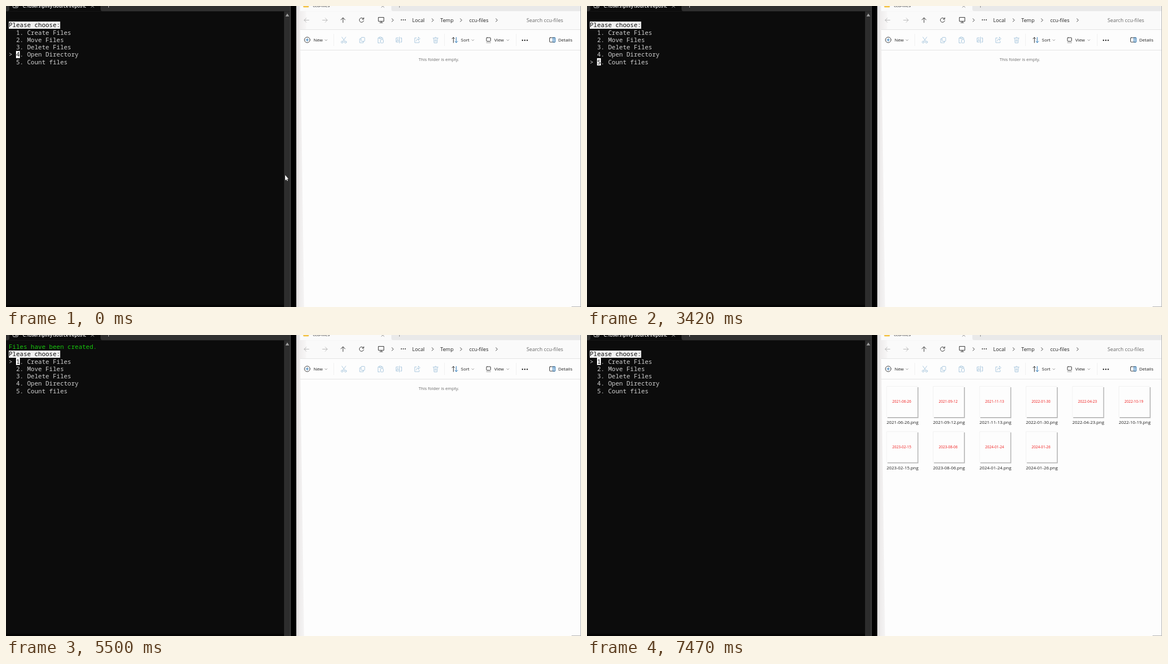
These frames come from a looping animation (1034 by 542 pixels, 8 s). An HTML page:

```html
<!DOCTYPE html>
<html lang="en">
<head>
<meta charset="utf-8">
<title>Terminal and folder</title>
<style>
html, body { margin: 0; width: 100%; height: 100%; overflow: hidden; background: #000; }
svg { display: block; }
text { font: 8px "Open Sans", "Noto Sans", sans-serif; fill: #1f1f1f; white-space: pre; }
.term text { font: 11px "Noto Sans Mono", "DejaVu Sans Mono", monospace; fill: #d2d2d2; }
.term .green { fill: #16c60c; }
.term .inv { fill: #0c0c0c; }
.tab { font-weight: 600; fill: #fff; }
.path text { font-size: 9.2px; }
.path .hint { fill: #666; }
.empty { font-size: 7.76px; fill: #6a6a6a; }
.file text { font-size: 7.9px; text-anchor: middle; }
.file .date { font-size: 6.5px; fill: #f01818; }
.line { fill: none; stroke: #3a3a3a; stroke-width: 1; stroke-linecap: round; stroke-linejoin: round; }
.soft { stroke: #b9b9b9; }
.off { stroke: #abc8de; }
.thin { stroke: #777; stroke-width: .8; }
.blue { stroke: #2a78b8; }

/* --row is the selected menu line */
.term { --row: 3; animation: row 8s step-end infinite; }
.cursor { transform: translateY(calc(var(--row) * 13.25px)); }
.digits { transform: translateY(calc(var(--row) * -13.25px)); }
.pointer, .count, .made, .empty, .files, .pages, .thumbs { animation: 8s step-end infinite; }
.pointer { animation-name: pointer; }
.count { animation-name: count; }
.made { animation-name: made; }
.empty { animation-name: empty; }
.files { animation-name: files; }
.pages { animation-name: pages; }
.thumbs { animation-name: thumbs; }
@keyframes row {
  0% { --row: 3; } 1.625% { --row: 4; } 47.625% { --row: 3; }
  53.125% { --row: 2; } 56.625% { --row: 1; } 61.625%, 100% { --row: 0; }
}
@keyframes pointer { 0% { opacity: 1; } 17.125%, 100% { opacity: 0; } }
@keyframes count { 0% { opacity: 0; } 17.125% { opacity: 1; } 42.75%, 100% { opacity: 0; } }
@keyframes made { 0% { opacity: 0; } 68.75% { opacity: 1; } 93.375%, 100% { opacity: 0; } }
@keyframes empty { 0% { opacity: 1; } 88.125%, 100% { opacity: 0; } }
@keyframes files { 0% { opacity: 0; } 88.125%, 100% { opacity: 1; } }
@keyframes pages { 0% { opacity: 1; } 89.75%, 100% { opacity: 0; } }
@keyframes thumbs { 0% { opacity: 0; } 89.75%, 100% { opacity: 1; } }
</style>
</head>
<body>
<svg width="1034" height="542" viewBox="0 0 1034 542">
  <defs>
    <linearGradient id="edge">
      <stop offset="0" stop-color="#dedcdc"/>
      <stop offset=".35" stop-color="#efeded"/>
      <stop offset="1" stop-color="#f8f7f7"/>
    </linearGradient>
    <path id="chev" class="line" d="M-1.5-2.7 1.2 0-1.5 2.7"/>
    <path id="drop" class="line thin" d="M-1.8-.8 0 1 1.8-.8"/>
    <path id="arrow" d="M4.3 0H-4.3M-.6-3.8-4.3 0-.6 3.8"/>
    <g id="dots"><circle cx="-3.5" r="1"/><circle r="1"/><circle cx="3.5" r="1"/></g>
    <g id="page">
      <path d="M-21.5 90.5H8.5L21.5 103.5V147.5H-21.5Z" fill="#fdfdfd" stroke="#8a8a8a"/>
      <path d="M8.5 90.5V103.5H21.5" fill="#fff" stroke="#8a8a8a"/>
      <rect x="-14" y="106" width="28" height="28" fill="#2180d8"/>
    </g>
    <g id="thumb">
      <rect x="-27" y="94" width="56" height="56" fill="#d6d6d6"/>
      <rect x="-27" y="94" width="55" height="55" fill="#aaa"/>
      <rect x="-29" y="92" width="56" height="56" fill="#fdfdfd"/>
      <path d="M-28.5 148V92.5H27" fill="none" stroke="#f1f1f1"/>
    </g>
  </defs>

  <!-- terminal -->
  <rect width="512" height="542" fill="#0c0c0c"/>
  <rect width="512" height="9.5" fill="#303030"/>
  <path d="M3 9.5Q6 9 6 5V0H170V5Q170 9 173 9.5Z" fill="#0c0c0c"/>
  <path d="M12.5-4V1.5Q12.5 3 14 3H20Q21.5 3 21.5 1.5V-4M17 .5H19.5" class="line" style="stroke:#eee"/>
  <text class="tab" x="30" y="2.6">C:\Users\pilvy\source\repos\c</text>
  <path d="M153-2 158 2.5M158-2 153 2.5M184.5-3V2.5" class="line" style="stroke:#bbb"/>
  <rect x="500" y="9.5" width="11" height="533" fill="#2d2d2d"/>
  <rect x="511" width="1" height="542" fill="#4b4b4b"/>
  <rect y="538" width="500" height="4" fill="#050505"/>
  <path d="M502.6 18.7 505.9 13.6 509.2 18.7Z" fill="#a0a0a0"/>
  <g class="term">
    <text class="green count" x="5" y="25">There are 0 files in the root, 0 in subdirectories.</text>
    <text class="green made" x="5" y="25">Files have been created.</text>
    <rect x="5" y="28" width="92.4" height="13" fill="#f2f2f2"/>
    <text class="inv" x="5" y="38.2">Please choose:</text>
    <g id="menu"></g>
    <g class="cursor">
      <text x="5" y="51.5">&gt;</text>
      <svg x="18" y="41" width="7" height="13.2">
        <rect width="7" height="13.2" fill="#fff"/>
        <g class="digits" id="digits"></g>
      </svg>
    </g>
  </g>
  <path class="pointer" d="M502 304.5V314L504.2 312 505.6 315 506.8 314.4 505.5 311.5H508Z" fill="#fff"/>

  <!-- folder window -->
  <rect x="522" width="512" height="542" fill="#fdfdfd"/>
  <path d="M522 0H540V42H529L536 542H522Z" fill="url(#edge)"/>
  <rect x="529" width="505" height="9.5" fill="#e9e9e9"/>
  <path d="M529 0H693V6Q693 9 696 9.5H529Z" fill="#fafafa"/>
  <rect x="540" y="9.5" width="494" height="32.5" fill="#fafafa"/>
  <path d="M529 42.5H1034M529 79.5H1034" stroke="#e4e4e4"/>
  <path d="M589.5 50V72M788.5 50V72M917.5 50V72" stroke="#f1f1f1"/>
  <path d="M1033.5 0V542M1017 541.5H1034" stroke="#b5b5b5"/>
  <rect x="534.5" y="-5" width="10" height="7.5" rx="1" fill="#f3c243"/>
  <text x="552" y="2.3">ccu-files</text>
  <path d="M675-2 680 2.5M680-2 675 2.5M707.5-3V2.5" class="line thin"/>

  <g class="path">
    <use href="#arrow" x="540.5" y="25.5" class="line soft"/>
    <use href="#arrow" class="line soft" transform="translate(573.5 25.5) rotate(180)"/>
    <use href="#arrow" class="line" transform="translate(606 25.5) rotate(90)"/>
    <path d="M643 23.5A4 4 0 1 0 643.3 26.5M643.3 21V23.8H640.5" class="line"/>
    <path d="M670 20.5H679.5V27.5H670ZM672 30H677.5M674.8 27.5V30" class="line"/>
    <use href="#dots" x="714.5" y="25" fill="#333"/>
    <use href="#chev" x="695.5" y="25.5"/><use href="#chev" x="767.5" y="25.5"/>
    <use href="#chev" x="818.5" y="25.5"/><use href="#chev" x="882.5" y="25.5"/>
    <text x="730.5" y="28.7">Local</text>
    <text x="781" y="28.7">Temp</text>
    <text x="833" y="28.7">ccu-files</text>
    <text class="hint" x="936" y="29">Search ccu-files</text>
  </g>

  <g>
    <circle cx="541.7" cy="61" r="5" class="line"/>
    <path d="M539.2 61H544.2M541.7 58.5V63.5" class="line blue"/>
    <text x="553" y="64.2">New</text><use href="#drop" x="575.5" y="61.5"/>
    <g class="line off">
      <path d="M604 56 609.5 64M611 56 605.5 64"/>
      <circle cx="604.5" cy="65" r="1.8"/><circle cx="610.5" cy="65" r="1.8"/>
      <rect x="638.5" y="56.5" width="6.5" height="7" rx="1"/>
      <path d="M638 59H636V66.2H642.5V64"/>
      <path d="M671.5 57.5H669V66.5H672M675 57.5H677.5V59.5M671.5 56H675V58.5H671.5Z"/>
      <rect x="673.5" y="60.5" width="5" height="6" rx=".8"/>
      <path d="M705.5 57.5H701.5V65H705.5M709.5 57.5H711.5V65H709.5M707.5 55.8V66.8M703 63.5 704.5 59.5 706 63.5"/>
      <path d="M738 57.5H735V66H743V63.5M737.5 63Q738 59.5 741.5 59.5V62L744.5 58.7 741.5 56V58"/>
      <path d="M768 57.8H777M769 58 769.8 66.5H775.2L776 58M771 57.5Q772.5 54.5 774 57.5M771.5 60.5V64M773.5 60.5V64"/>
    </g>
    <path d="M804.5 66V56.5M802 59 804.5 56.5 807 59" class="line"/>
    <path d="M809.7 56.5V66M807.2 63.5 809.7 66 812.2 63.5" class="line blue"/>
    <text x="818" y="64.2">Sort</text><use href="#drop" x="839.5" y="61.5"/>
    <rect x="864" y="57" width="7.5" height="6.5" rx="1" class="line"/>
    <path d="M864 66H871.5" class="line thin"/>
    <text x="878" y="64.2">View</text><use href="#drop" x="902.5" y="61.5"/>
    <use href="#dots" transform="translate(933 61.8) scale(1.2)" fill="#222"/>
    <rect x="977.5" y="57" width="10" height="8" rx="1" class="line"/>
    <path d="M984 57H987.5V65H984ZM985 59.5H986.5M985 62H986.5" class="line blue"/>
    <text x="993" y="64.2">Details</text>
  </g>

  <text class="empty" x="742" y="99">This folder is empty.</text>
  <g class="files" id="files"></g>
</svg>
<script>
const fill = (id, items, draw) => {
  document.getElementById(id).innerHTML = items.map(draw).join("");
};
const menu = ["Create Files", "Move Files", "Delete Files", "Open Directory", "Count files"];
const pitch = 13.25;
fill("menu", menu, (name, i) => `<text x="18.2" y="${51.5 + i * pitch}">${i + 1}. ${name}</text>`);
fill("digits", menu, (name, i) => `<text class="inv" x=".2" y="${10.5 + i * pitch}">${i + 1}</text>`);

const dates = ["2021-06-26", "2021-09-12", "2021-11-13", "2022-01-30", "2022-04-23",
  "2022-10-19", "2023-02-15", "2023-08-06", "2024-01-24", "2024-01-26"];
fill("files", dates, (date, i) => {
  const x = 567.4 + (i % 6) * 83.5, y = Math.floor(i / 6) * 81.5;
  const page = i ? '<use class="pages" href="#page"/>' : "";
  return `<g class="file" transform="translate(${x} ${y})">${page}
    <g class="${i ? "thumbs" : ""}"><use href="#thumb"/><text class="date" x="-1.4" y="122.2">${date}</text></g>
    <text y="160.4">${date}.png</text></g>`;
});
</script>
</body>
</html>
```
